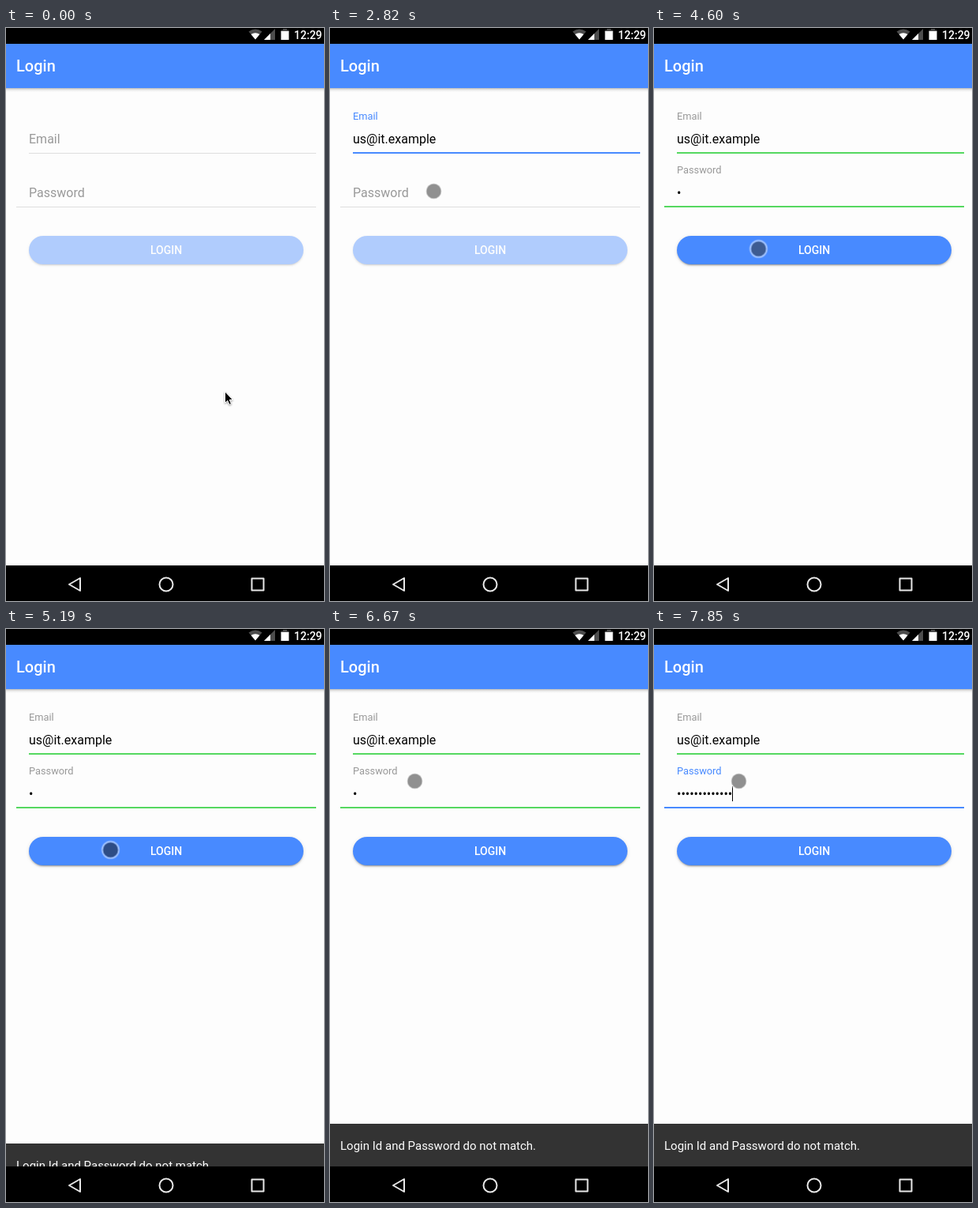
An HTML page for the animation above (8 s loop, 403 px wide and 725 px high).

```html
<!DOCTYPE html>
<html lang="en">
<head>
<meta charset="utf-8">
<title>Login form</title>
<style>
  :root { --blue: #488aff; --green: #55d860; --grey: #999; }
  html, body { margin: 0; width: 100%; height: 100%; overflow: hidden; background: #fdfdfd; }
  svg { display: block; width: 403px; height: 725px; }
  text { font: 16px Roboto, sans-serif; }
  .bold { font-weight: 500; fill: #fff; }

  /* The interface changes in discrete steps: 1% is 80 ms. */
  .anim { animation: 8s step-end -10ms infinite; }

  #arrow { animation-name: arrow; }
  @keyframes arrow { 0% { opacity: 1 } 1.875%, 100% { opacity: 0 } }

  #dot { animation-name: move; }
  @keyframes move {
    0% { transform: translate(281px, 463px); opacity: 0 }
    1.875% { transform: translate(281.5px, 463px); opacity: 1 }
    3.75% { transform: translate(280px, 446px) }
    5.625% { transform: translate(277px, 420px) }
    7.375% { transform: translate(273.5px, 399px) }
    9.25% { transform: translate(272.5px, 393.5px) }
    13% { transform: translate(264px, 350px) }
    14.875% { transform: translate(237px, 240px) }
    16.7% { transform: translate(214px, 158px) }
    18.5% { transform: translate(208.5px, 136.5px) }
    27.75% { transform: translate(201px, 144px) }
    29.625% { transform: translate(177px, 168px) }
    31.5% { transform: translate(150px, 192px) }
    33.375% { transform: translate(135px, 204px) }
    35.25% { transform: translate(131.5px, 206.5px) }
    46.375% { transform: translate(131.5px, 212px) }
    48.25% { transform: translate(132px, 231px) }
    50% { transform: translate(132px, 254px) }
    51.875% { transform: translate(132px, 270px) }
    53.75% { transform: translate(132.5px, 277px) }
    55.625% { transform: translate(132.5px, 279.5px) }
    77.75% { transform: translate(126px, 246px) }
    79.625% { transform: translate(112px, 178px) }
    81.5% { transform: translate(107px, 154px) }
    83.375%, 100% { transform: translate(107.5px, 192.5px); opacity: 1 }
  }
  #press { animation-name: press; }
  @keyframes press { 0% { opacity: 0 } 59.375% { opacity: .3 } 77.75%, 100% { opacity: 0 } }
  #ripple { animation-name: ripple; }
  @keyframes ripple { 0% { opacity: 0 } 59.375% { opacity: .07 } 61.125%, 100% { opacity: 0 } }

  #mailLabel { animation-name: mailLabel; }
  @keyframes mailLabel {
    0% { transform: translate(29px, 146px); fill: var(--grey) }
    22.25% { transform: translate(29px, 116px) scale(.8); fill: var(--blue) }
    37%, 100% { transform: translate(29px, 116px) scale(.8); fill: var(--grey) }
  }
  #mailLine { animation-name: mailLine; }
  @keyframes mailLine {
    0% { fill: transparent } 22.25% { fill: var(--blue) } 37%, 100% { fill: var(--green) }
  }
  #mail { animation-name: mail; }
  @keyframes mail { 0% { opacity: 0 } 26%, 100% { opacity: 1 } }

  #passLabel { animation-name: passLabel; }
  @keyframes passLabel {
    0% { transform: translate(29px, 214px); fill: var(--grey) }
    37% { transform: translate(29px, 188px) scale(.84); fill: var(--blue) }
    39% { transform: translate(29px, 184px) scale(.8); fill: var(--blue) }
    57.5% { transform: translate(29px, 184px) scale(.8); fill: var(--grey) }
    85.25%, 100% { transform: translate(29px, 184px) scale(.8); fill: var(--blue) }
  }
  #passLine { animation-name: passLine; }
  @keyframes passLine {
    0% { fill: transparent } 37% { fill: var(--blue) }
    57.5% { fill: var(--green) } 85.25%, 100% { fill: var(--blue) }
  }
  #short { animation-name: short; }
  @keyframes short { 0% { opacity: 0 } 44.5% { opacity: 1 } 92.625%, 100% { opacity: 0 } }
  #long { animation-name: long; }
  @keyframes long { 0% { opacity: 0 } 98.125%, 100% { opacity: 1 } }
  #caret { animation-name: caret; }
  @keyframes caret {
    0% { transform: none; opacity: 0 } 92.625% { transform: translateX(-70px); opacity: 1 }
    98.125%, 100% { transform: none; opacity: 1 }
  }

  #button { animation-name: button; }
  @keyframes button {
    0% { opacity: .42 } 44.5% { opacity: 1 }
    92.625% { opacity: .6 } 94.5% { opacity: .42 } 98.125%, 100% { opacity: 1 }
  }
  #pill {
    width: 348px; height: 36px; border-radius: 18px; background: var(--blue);
    box-shadow: 0 2px 2px rgba(0,0,0,.14), 0 3px 1px -2px rgba(0,0,0,.2), 0 1px 5px rgba(0,0,0,.12);
  }

  #toast { animation-name: toast; }
  @keyframes toast {
    0% { transform: translateY(54px) } 64.875% { transform: translateY(25px) }
    66.75% { transform: translateY(4px) } 68.5%, 100% { transform: none }
  }
</style>
</head>
<body>
<svg viewBox="0 0 403 725">
  <defs>
    <linearGradient id="shade" x2="0" y2="1">
      <stop stop-opacity=".26"/><stop offset=".45" stop-opacity=".08"/><stop offset="1" stop-opacity="0"/>
    </linearGradient>
    <clipPath id="pillClip"><rect x="29" y="263" width="348" height="36" rx="18"/></clipPath>
  </defs>
  <rect width="403" height="725" fill="#fdfdfd"/>
  <rect y="76" width="403" height="5" fill="url(#shade)"/>
  <rect y="20" width="403" height="56" fill="#488aff"/>
  <text class="bold" x="13" y="55" style="font-size:20px">Login</text>

  <!-- fields -->
  <path d="M29 158.5H393M13 226.5H393" stroke="#dedede"/>
  <rect id="mailLine" class="anim" x="29" y="157" width="364" height="2"/>
  <rect id="passLine" class="anim" x="13" y="225" width="380" height="2"/>
  <text id="mailLabel" class="anim">Email</text>
  <text id="mail" class="anim" x="29" y="146">us@it.example</text>
  <text id="passLabel" class="anim">Password</text>
  <text id="short" class="anim" x="29" y="214">•</text>
  <text id="long" class="anim" x="29" y="214">•••••••••••••</text>
  <rect id="caret" class="anim" x="99" y="199" width="1" height="19"/>

  <!-- button -->
  <g id="button" class="anim">
    <foreignObject x="19" y="253" width="368" height="60">
      <div style="padding:10px"><div id="pill"></div></div>
    </foreignObject>
    <text class="bold" x="203" y="286" text-anchor="middle" style="font-size:14px">LOGIN</text>
  </g>
  <g clip-path="url(#pillClip)"><circle id="ripple" class="anim" cx="133" cy="279.5" r="89"/></g>

  <!-- toast -->
  <g id="toast" class="anim">
    <rect y="626" width="403" height="54" fill="#333"/>
    <text x="13" y="659" fill="#fff" style="font-size:15px">Login Id and Password do not match.</text>
  </g>

  <!-- system bars -->
  <path d="M0 0H403V20H0ZM0 680H403V725H0Z"/>
  <path d="M307.500 4.500Q316 -1.500 324.500 4.500L316 14.500Z" fill="#4d4d4d"/>
  <path d="M310.500 8Q316 4.500 321.500 8L316 14.500Z" fill="#fff"/>
  <path d="M341 1V15H327Z" fill="#4d4d4d"/>
  <path d="M335 7V15H327Z" fill="#fff"/>
  <path d="M351 1h5v1.500h2.500V5H348.500V2.500H351Z" fill="#4d4d4d"/>
  <path d="M348.500 4H358.500V15H348.500Z" fill="#fff"/>
  <text class="bold" x="365" y="14" style="font-size:14px">12:29</text>
  <g fill="none" stroke="#e8e8e8" stroke-width="2" stroke-linejoin="round">
    <path d="M94 696V712L80 704Z"/>
    <circle cx="203" cy="704" r="8.500"/>
    <rect x="311.500" y="696.500" width="15" height="15"/>
  </g>

  <!-- pointer -->
  <path id="arrow" class="anim" d="M277.500 460V474.500L280.800 471.500L283 476.500L285.500 475.400L283.300 470.500H287.500Z"
    stroke="#fff" style="filter:drop-shadow(0 1px 1px rgba(0,0,0,.4))"/>
  <g id="dot" class="anim">
    <circle r="9.500" fill="#363636" fill-opacity=".55"/>
    <circle r="10.500" fill="none" stroke="#fff" stroke-opacity=".5" stroke-width="2"/>
    <circle id="press" class="anim" r="9.500" fill="#0a2a6a"/>
  </g>
</svg>
</body>
</html>
```
